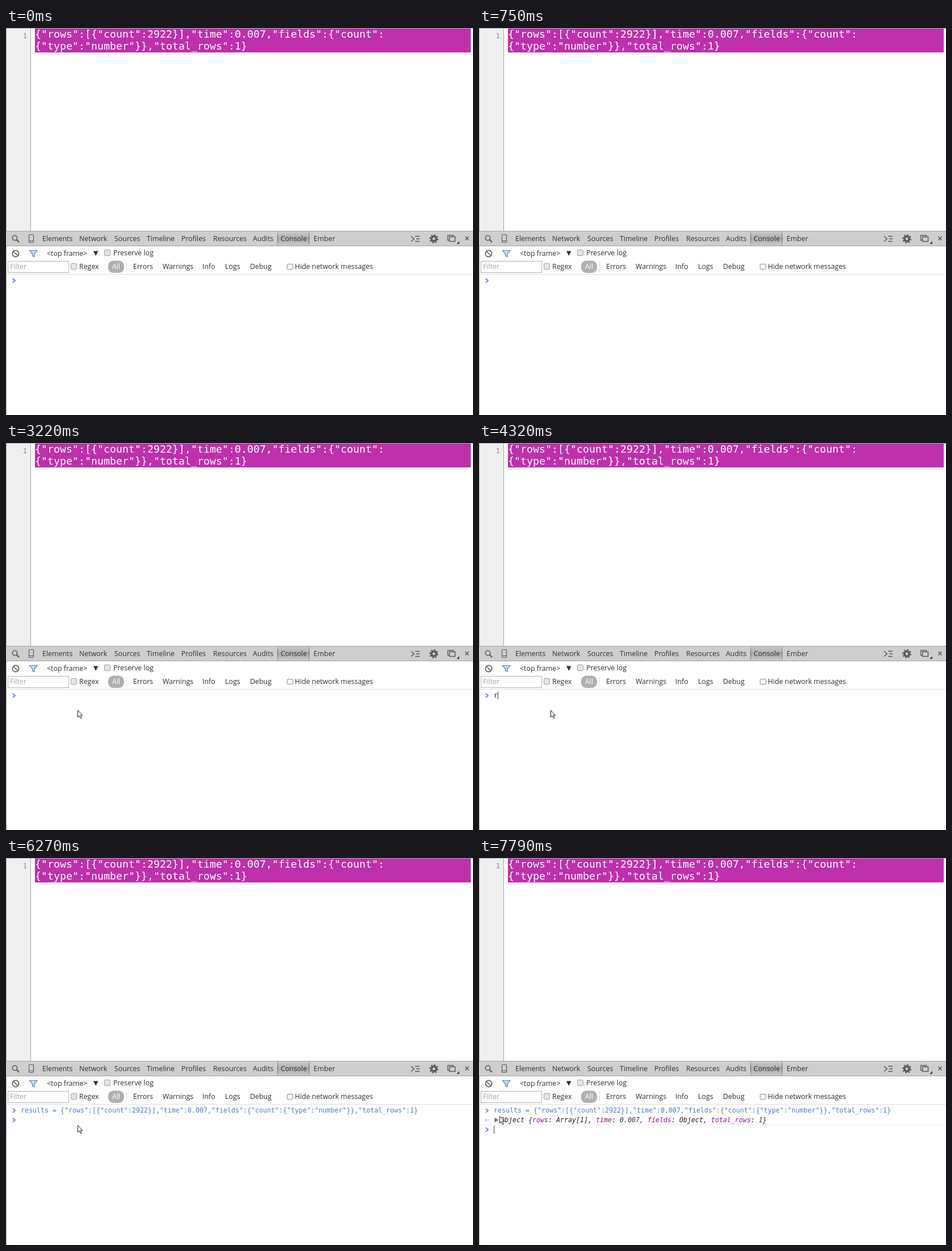
An HTML page for the animation above (8 s loop, 823 by 681 pixels).

```html
<!DOCTYPE html>
<html lang="en">
<head>
<meta charset="utf-8">
<title>Console</title>
<style>
html, body { margin: 0; width: 100%; height: 100%; overflow: hidden; background: #fff; }
svg { display: block; }
text { white-space: pre; }
.ui { font: 12.4px "Open Sans", "Noto Sans", sans-serif; fill: #303030; }
.code { font: 18.27px "DejaVu Sans Mono", monospace; }
.con { font: 11.63px "DejaVu Sans Mono", monospace; fill: #222; }
.icon { fill: none; stroke: #5a5a5a; stroke-width: 1.6; }
.box { fill: #e6e6e6; stroke: #a0a0a0; }
.key { fill: #9b119b; }
.num { fill: #33334d; }
</style>
</head>
<body>
<svg width="823" height="681" viewBox="0 0 823 681">
  <defs>
    <linearGradient id="tab" x2="0" y2="1">
      <stop offset="0" stop-color="#cacaca"/>
      <stop offset=".5" stop-color="#adadad"/>
      <stop offset="1" stop-color="#cacaca"/>
    </linearGradient>
    <linearGradient id="tabEdge" x2="0" y2="1">
      <stop offset="0" stop-color="#b4b4b4"/>
      <stop offset=".5" stop-color="#707070"/>
      <stop offset="1" stop-color="#b4b4b4"/>
    </linearGradient>
    <clipPath id="picked">
      <rect id="pick1" y="1" width="820" height="21"/>
      <rect id="pick2" y="22" width="820" height="21"/>
    </clipPath>
    <g id="lines" class="code"><text x="51" y="17"></text><text x="51" y="38"></text></g>
    <path id="chevron" d="M12 -3.5L16 0L12 3.5" fill="none" stroke-width="1.8"/>
  </defs>

  <!-- editor -->
  <rect width="823" height="681" fill="#fff"/>
  <rect x="1" y="1" width="42" height="357" fill="#efefef"/>
  <rect x="43" y="1" width="1" height="357" fill="#a0a0a0"/>
  <path d="M0 .5h823M.5 0v681" stroke="#a8a8a8"/>
  <text x="29.5" y="18" font-size="13" font-family="DejaVu Sans Mono, monospace" fill="#8c8ca6">1</text>
  <use href="#lines" fill="#111"/>
  <g clip-path="url(#picked)">
    <rect x="51" y="1" width="768" height="42" fill="#be30ac"/>
    <use href="#lines" fill="#fff"/>
  </g>

  <!-- tab bar -->
  <rect y="357" width="823" height="27" fill="#a3a3a3"/>
  <rect y="358" width="823" height="25" fill="#cecece"/>
  <rect x="478" y="358" width="57" height="25" fill="url(#tab)"/>
  <rect x="478" y="358" width="1.5" height="25" fill="url(#tabEdge)"/>
  <rect x="533.5" y="358" width="1.5" height="25" fill="url(#tabEdge)"/>
  <g class="icon">
    <circle cx="15.5" cy="369.5" r="4.2"/><path d="M18.5 372.5L23 377" stroke-width="2.4"/>
    <rect x="40.5" y="363.5" width="8" height="14" rx="1.5" stroke-width="1.2"/>
    <path d="M41 374.5h7" stroke-width="1"/>
    <path d="M714 366.5l5 4.5l-5 4.5M721 366.5h8M723 371h6M721 375.5h8"/>
    <circle cx="754" cy="371" r="4.2" stroke-width="3.6"/>
    <circle cx="754" cy="371" r="6.8" stroke-width="2.4" stroke-dasharray="2.7 2.64"/>
    <path d="M781 373.5h-2.5v-8.5h10v2" stroke-width="1.3"/>
    <rect x="781.5" y="367.5" width="10" height="8" stroke-width="1.5"/>
    <path d="M799 375v5h-5z" fill="#444" stroke="none"/>
    <path d="M809.5 367l6 6.5M815.5 367l-6 6.5"/>
  </g>

  <!-- console controls -->
  <g class="icon">
    <circle cx="17" cy="397" r="5.6"/><path d="M13 393l8 8"/>
    <path d="M41.5 391.5h13.5l-5 6v5l-3.5 -1.5v-3.5z" fill="#c5daf7" stroke="#5586cc" stroke-width="1.2"/>
    <path d="M154 392.5h8.5l-4.25 8.5z" fill="#333" stroke="none"/>
  </g>
  <rect class="box" x="173.5" y="390.5" width="10" height="10" rx="1.5"/>
  <rect class="box" x="114.5" y="414.5" width="10" height="10" rx="1.5"/>
  <rect x="495.5" y="415.5" width="10" height="9" rx="1.5" fill="#fff" stroke="#8c8c8c"/>
  <rect x="3.5" y="410.5" width="107" height="20" fill="#fff" stroke="#b5b5b5"/>
  <rect x="180" y="409.5" width="28" height="21.5" rx="9" fill="#b0b0b0"/>
  <path d="M212.5 412v17" stroke="#ddd"/>
  <path d="M1 433.5h822" stroke="#e0e0e0"/>
  <g id="labels" class="ui"></g>

  <!-- console -->
  <g class="con">
    <use id="echoMark" href="#chevron" y="444.5" stroke="#8c8c8c"/>
    <use id="prompt" href="#chevron" stroke="#5b8cd9"/>
    <text id="input" x="26" y="448"></text>
    <g id="popup">
      <text x="47" y="448" fill="#aaa">izeBy</text>
      <rect x="23.5" y="453.5" width="80" height="49" fill="#fff" stroke="#a8a8a8"/>
      <rect x="24" y="454" width="79" height="16" fill="#3879d9"/>
      <text x="26" y="466" fill="#fff">resizeBy</text>
      <text x="26" y="482">resizeTo</text>
      <text x="26" y="498">results</text>
    </g>
    <g id="result">
      <path d="M1 469.5h822" stroke="#f0f0f0"/>
      <path d="M14 458.5l-3 2.5l3 2.5" fill="none" stroke="#b8b8b8" stroke-width="1.3"/>
      <circle cx="16.5" cy="461" r="1" fill="#b8b8b8"/>
      <path d="M27.5 457l7 4l-7 4z" fill="#6e6e6e"/>
      <text x="38" y="465" font-style="italic">Object {<tspan class="key">rows</tspan>: Array[1], <tspan class="key">time</tspan>: <tspan class="num">0.007</tspan>, <tspan class="key">fields</tspan>: Object, <tspan class="key">total_rows</tspan>: <tspan class="num">1</tspan>}</text>
    </g>
  </g>
  <rect id="caret" width="1" height="14" fill="#444"/>
  <path id="pointer" d="M.5 .5v12l2.7 -2.5l2.2 4.6l2 -.9l-2.1 -4.5h3.4z" fill="#fff" stroke="#222"/>
</svg>
<script>
const $ = id => document.getElementById(id);
const show = (id, on) => $(id).style.display = on ? '' : 'none';
const within = (t, from, to) => t >= from && t < to;

const json = ['{"rows":[{"count":2922}],"time":0.007,"fields":{"count":', '{"type":"number"}},"total_rows":1}'];
document.querySelectorAll('#lines text').forEach((el, i) => el.textContent = json[i]);

const labelRows = {
  375: { Elements: 64, Network: 129, Sources: 191, Timeline: 248, Profiles: 309, Resources: 365,
         Audits: 435, Console: 484, Ember: 542 },
  400: { 'Preserve log': 189 },
  401: { '<top frame>': 72 },
  424: { Filter: 7, Regex: 129, All: 187, Errors: 224, Warnings: 276, Info: 346, Logs: 386,
         Debug: 430, 'Hide network messages': 509 }
};
const tints = { Filter: '#a5a5a5', All: '#fff' };
for (const [y, row] of Object.entries(labelRows)) {
  for (const [label, x] of Object.entries(row)) {
    const el = document.createElementNS('http://www.w3.org/2000/svg', 'text');
    el.setAttribute('x', x);
    el.setAttribute('y', y);
    el.textContent = label;
    if (tints[label]) el.style.fill = tints[label];
    $('labels').append(el);
  }
}

const LOOP = 8000, PASTE = 5670, ENTER = 6270, RESULT = 6340;
const command = 'results = ';
const keyTimes = [4320, 4420, 4500, 4670, 4750, 4830, 4910, 4990, 5060, 5150];
const caretOn = [[3320, 3910], [4320, PASTE], [6420, 6950], [7370, LOOP]];

// The selection is dragged backwards from the end of the second line.
function drawSelection(t) {
  const step = Math.floor((t - 50) / 50);
  let first = 51, second = 51;
  if (step >= 0 && step < 4) {
    first = 820;
    second = step ? 51 + 11 * (34 - 3 * step) : 820;
  } else if (step >= 4 && step < 14) {
    first = 51 + 11 * Math.round(19 * (14 - step) / 9);
  }
  $('pick1').setAttribute('x', first);
  $('pick2').setAttribute('x', second);
}

function drawConsole(t) {
  const typed = keyTimes.filter(k => t >= k).length;
  const entered = t >= ENTER, done = t >= RESULT;
  $('input').textContent = command.slice(0, typed) + (t >= PASTE ? json.join('') : '');
  $('input').style.fill = entered ? '#4a80cb' : '#222';
  $('prompt').setAttribute('y', done ? 478 : entered ? 461 : 444.5);
  show('echoMark', entered);
  show('result', done);
  show('popup', within(t, 4590, 4670));
  show('caret', caretOn.some(([from, to]) => within(t, from, to)));
  $('caret').setAttribute('x', entered ? 26 : 26 + 7 * typed);
  $('caret').setAttribute('y', entered ? 471 : 437);
}

const ease = (t, from, to) => {
  const p = Math.min(1, Math.max(0, (t - from) / (to - from)));
  return p * p * (3 - 2 * p);
};

function drawPointer(t) {
  const down = ease(t, 2420, 2830), back = ease(t, 7370, 7790);
  show('pointer', t >= 2420);
  $('pointer').setAttribute('transform', `translate(${34 + 92 * down - 90 * back} ${19 + 451 * down - 16 * back})`);
}

function frame() {
  const t = performance.now() % LOOP;
  drawSelection(t);
  drawConsole(t);
  drawPointer(t);
  requestAnimationFrame(frame);
}
frame();
</script>
</body>
</html>
```
